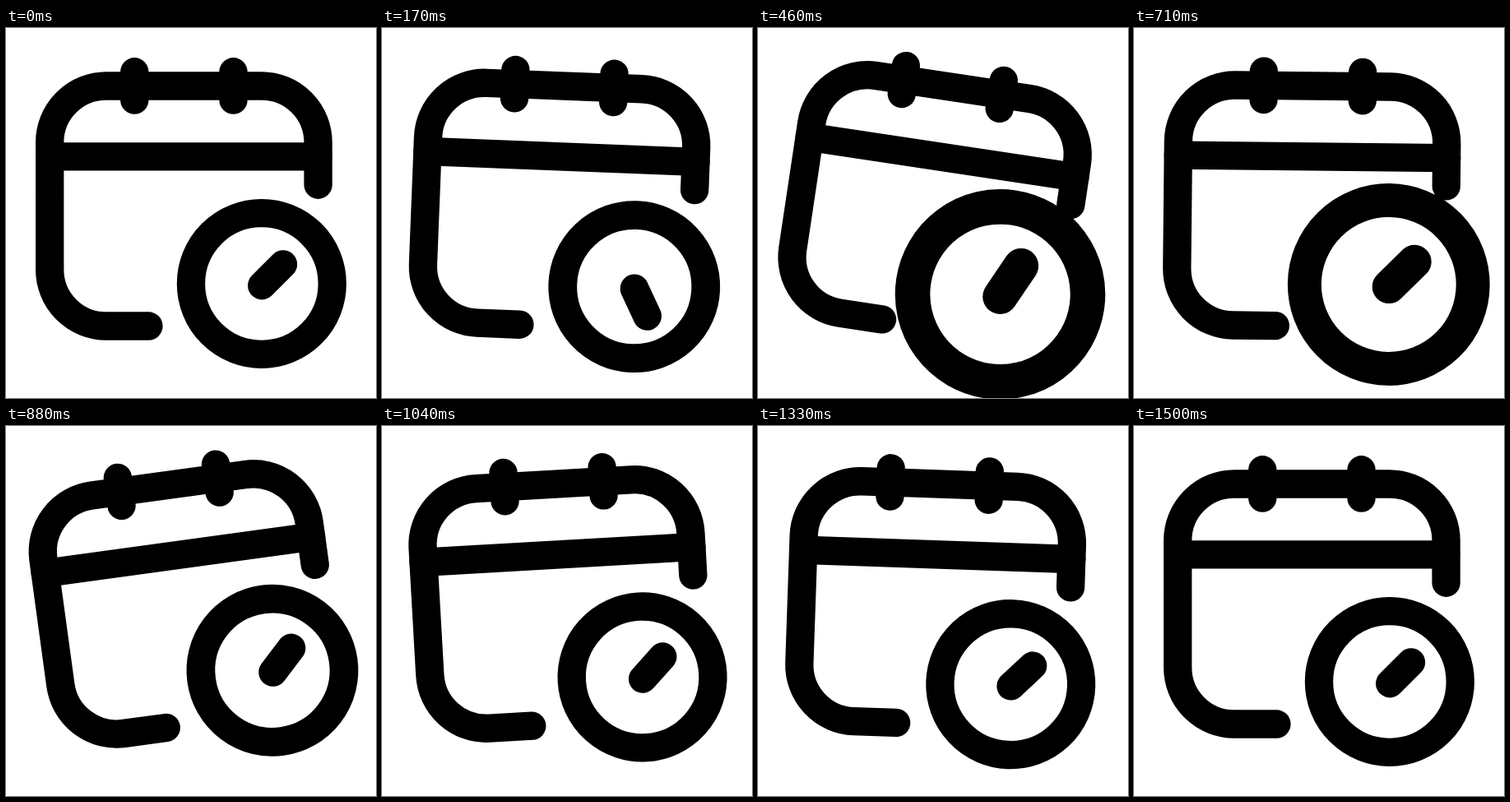
An HTML page with a canvas for the animation above (1.54 s loop, 450 by 450 pixels).

```html
<!DOCTYPE html>
<html lang="en">
<head>
<meta charset="utf-8">
<title>Calendar clock</title>
<style>
  html, body { margin: 0; width: 100%; height: 100%; overflow: hidden; background: #fff; }
  canvas { display: block; width: 100vw; height: 100vh; }
</style>
</head>
<body>
<canvas id="stage" width="450" height="450"></canvas>
<script>
const ctx = document.getElementById('stage').getContext('2d');
const LOOP = 1540;
const UNIT = 17.18;
const RAD = Math.PI / 180;

const smooth = t => t * t * (3 - 2 * t);
const soft = t => t + 0.46 * (smooth(t) - t);

// Keys are [step, value] pairs at 24 steps per second.
const TILT = [[0, 0], [12, 8.7], [22.5, -8.75], [28, 3.95], [36, 0]];
const ZOOM = [[3, 1], [10, 1.24], [15, 1.24], [22, 1]];
const SPIN = [[0, 0], [12, 360]];

function valueAt(keys, step, ease = smooth) {
  if (step <= keys[0][0]) return keys[0][1];
  for (let i = 1; i < keys.length; i++) {
    const [start, from] = keys[i - 1];
    const [end, to] = keys[i];
    if (step <= end) return from + (to - from) * ease((step - start) / (end - start));
  }
  return keys[keys.length - 1][1];
}

// Step starts are rounded to hundredths of a second.
function stepAt(ms) {
  return Math.ceil((Math.floor(ms / 10) + 0.5) * 0.24) - 1;
}

function line(x1, y1, x2, y2) {
  ctx.beginPath();
  ctx.moveTo(x1, y1);
  ctx.lineTo(x2, y2);
  ctx.stroke();
}

function drawCalendar() {
  ctx.beginPath();
  ctx.moveTo(-2.5, 9);
  ctx.lineTo(-5.5, 9);
  ctx.arc(-5.5, 5, 4, Math.PI / 2, Math.PI);
  ctx.arc(-5.5, -4, 4, Math.PI, Math.PI * 1.5);
  ctx.arc(5.5, -4, 4, -Math.PI / 2, 0);
  ctx.lineTo(9.5, -1);
  ctx.stroke();
  line(-9.5, -3, 9.5, -3);
  line(-3.5, -9, -3.5, -7);
  line(3.5, -9, 3.5, -7);
}

function drawClock(zoom, spin) {
  ctx.save();
  ctx.translate(5.5, 6);
  ctx.scale(zoom, zoom);
  ctx.beginPath();
  ctx.arc(0, 0, 5, 0, Math.PI * 2);
  ctx.stroke();
  ctx.translate(0.02, 0.13);
  ctx.rotate(spin * RAD);
  line(0, 0, 1.5, -1.5);
  ctx.restore();
}

function draw(ms) {
  const step = stepAt(ms % LOOP);
  ctx.setTransform(1, 0, 0, 1, 0, 0);
  ctx.fillStyle = '#fff';
  ctx.fillRect(0, 0, 450, 450);
  ctx.translate(216.4, 207.9);
  ctx.scale(UNIT, UNIT);
  ctx.rotate(valueAt(TILT, step) * RAD);
  ctx.strokeStyle = '#000';
  ctx.lineWidth = 2;
  ctx.lineCap = 'round';
  drawCalendar();
  drawClock(valueAt(ZOOM, step), valueAt(SPIN, step, soft));
}

function tick() {
  draw(performance.now());
  requestAnimationFrame(tick);
}
tick();
</script>
</body>
</html>
```
